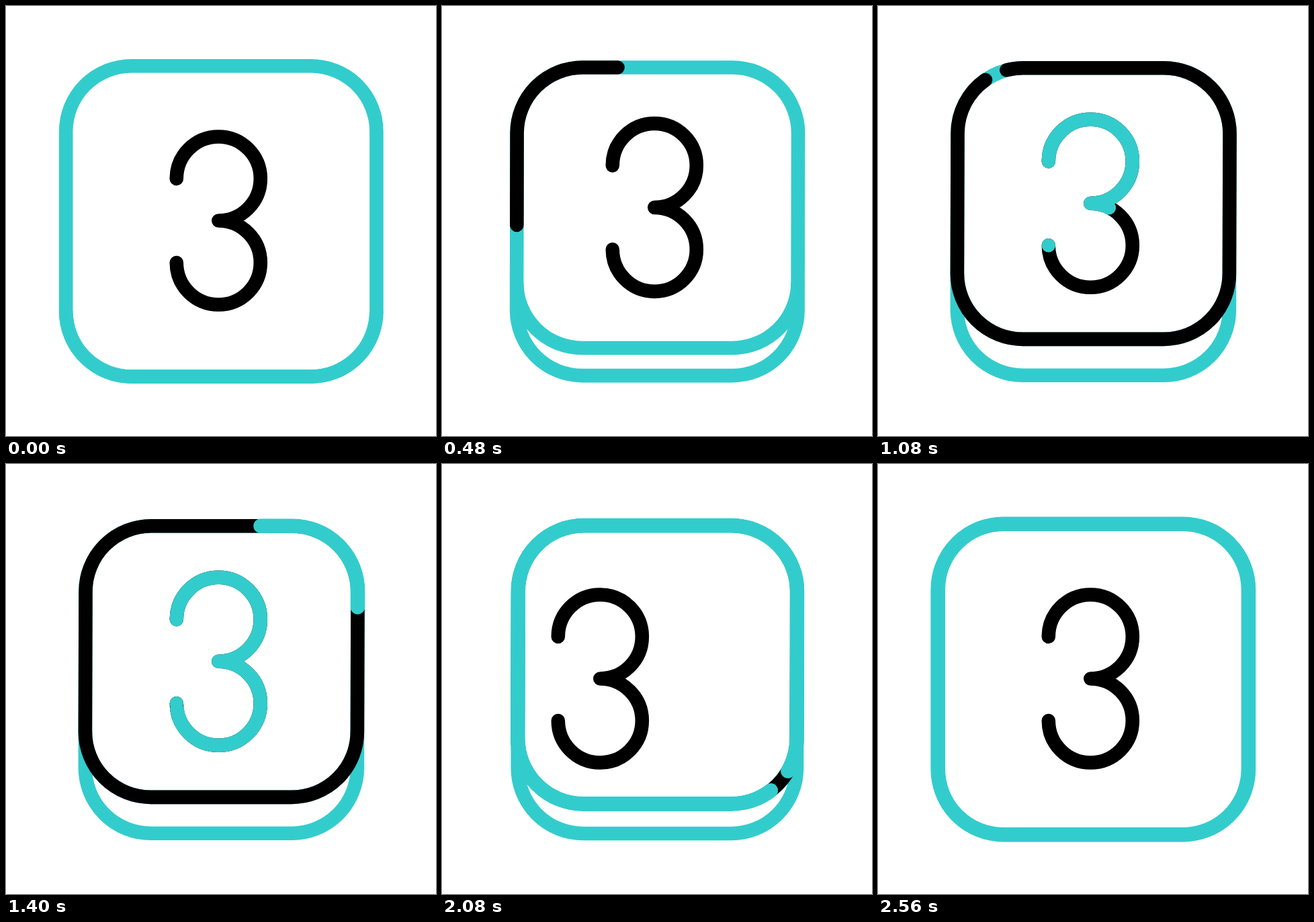
Animation of 640 by 640 pixels, one loop 2.8 s. Source, as an HTML page:

```html
<!DOCTYPE html>
<html lang="en">
<head>
<meta charset="utf-8">
<title>Key three</title>
<style>
html, body { margin: 0; width: 100%; height: 100%; overflow: hidden; background: #fff; }
svg { display: block; width: 100vw; height: 100vh; }
path { fill: none; stroke-width: 20.6; stroke-linecap: round; stroke-linejoin: round; }
.teal { stroke: #33cccc; }
.black { stroke: #000; }
#tealRim { stroke-width: 21.6; }
#clip path { fill: #000; stroke: none; }
</style>
</head>
<body>
<svg viewBox="0 0 640 640">
  <defs><clipPath id="clip"><path id="window"/></clipPath></defs>
  <g clip-path="url(#clip)">
    <path id="digit" class="black"/>
    <path id="tealDigit" class="teal" pathLength="1"/>
  </g>
  <path id="base" class="teal" style="stroke-linecap:butt"/>
  <path id="rim" class="teal"/>
  <path id="blackRim" class="black" pathLength="1"/>
  <path id="tealRim" class="teal" pathLength="1"/>
</svg>
<script>
const STEP = 40, COUNT = 70, R = 97.6, SLIDE = 288;
const el = id => document.getElementById(id);
const lerp = (a, b, k) => a + (b - a) * k;
const phase = (t, from, to) => Math.min(1, Math.max(0, (t - from) / (to - from)));

// Cubic easing with flat ends; x2 is the second handle's time
function ease(x, x2 = 2 / 3) {
  let lo = 0, hi = 1;
  for (let i = 0; i < 30; i++) {
    const s = (lo + hi) / 2, r = 1 - s;
    if (s * r * r + 3 * x2 * s * s * r + s * s * s < x) lo = s; else hi = s;
  }
  return x >= 1 ? 1 : lo * lo * (3 - 2 * lo);
}
const soft = x => ease(x, 1 / 6);

const arc = (x, y) => `A${R} ${R} 0 0 1 ${x} ${y}`;

function tilePath(l, r, top, bottom, skew) {
  return `M${l + R} ${top}H${r - R}${arc(r, top + R)}L${r - skew} ${bottom - R}` +
    `${arc(r - R - skew, bottom)}H${l + R - skew}${arc(l - skew, bottom - R)}` +
    `L${l} ${top + R}${arc(l + R, top)}Z`;
}

function basePath(l, r, y, bottom) {
  return `M${r} ${y}V${bottom - R}${arc(r - R, bottom)}H${l + R}${arc(l, bottom - R)}V${y}`;
}

function trim(path, start, length) {
  path.style.display = length > 0.001 ? "" : "none";
  if (length > 0.999) {
    path.removeAttribute("stroke-dasharray");
  } else {
    path.setAttribute("stroke-dasharray", `${length} ${1 - length}`);
    path.setAttribute("stroke-dashoffset", 1 - start % 1);
  }
}

const move = (path, x, y) => path.setAttribute("transform", `translate(${x} ${y})`);

function draw(t) {
  const lift = ease(phase(t, 0.7, 17.2)) - soft(phase(t, 49.4, 63.1));
  const left = lerp(89.2, 118.5, lift), right = lerp(551.4, 523.5, lift);
  const top = lerp(89.2, 92.2, lift), bottom = lerp(551.6, 495.9, lift);
  const skew = 0.6 * lift;
  const tile = tilePath(left, right, top, bottom, skew);
  for (const id of ["window", "rim", "blackRim", "tealRim"]) el(id).setAttribute("d", tile);
  el("base").setAttribute("d",
    basePath(left - skew, right - skew, bottom - R, lerp(551.6, 549.7, lift)));

  const inkLength = t < 58 ? soft(phase(t, 6.6, 32.3)) : 0;
  trim(el("blackRim"), 0.744 + 0.0117 * (t - 6.6), inkLength);
  trim(el("tealRim"), 0.011 + 0.0203 * Math.max(0, t - 30), soft(phase(t, 30, 58)));

  // The teal digit leaves to the right, a fresh black one enters from the left
  const painted = ease(phase(t, 16.3, 36.4));
  const out = SLIDE * ease(phase(t, 42.1, 52.1));
  const shift = -25.7 * ease(phase(t, 0.7, 17.2));
  trim(el("tealDigit"), 0, out < SLIDE ? painted : 0);
  move(el("tealDigit"), out, shift);
  if (t < 40) move(el("digit"), 0, shift);
  else move(el("digit"), -SLIDE * (1 - soft(phase(t, 46, 60))), 0);
}

const three = "M253.8 257A62.5 62.5 0 1 1 316.3 319.5A62.5 62.5 0 1 1 253.8 382";
el("digit").setAttribute("d", three);
el("tealDigit").setAttribute("d", three);

const begin = performance.now();
function tick(now) {
  draw(Math.floor(Math.max(0, now - begin) / STEP) % COUNT);
  requestAnimationFrame(tick);
}
draw(0);
requestAnimationFrame(tick);
</script>
</body>
</html>
```
